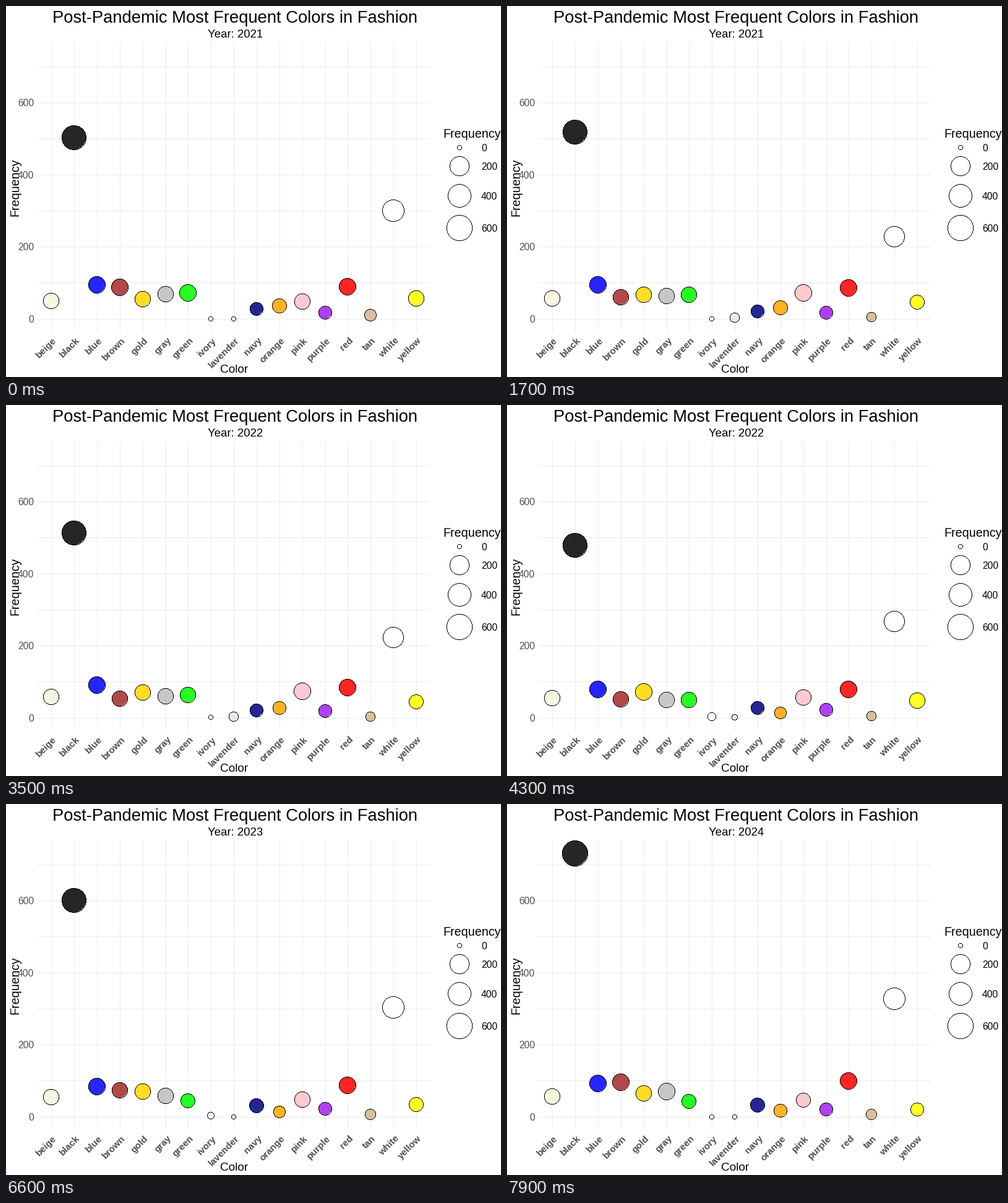
A matplotlib script for the animation above (8000 ms loop, 800x600 px).

```python
import matplotlib.pyplot as plt
import numpy as np
from matplotlib.animation import FuncAnimation
from matplotlib.colors import to_rgb
from math import floor

WIDTH, HEIGHT, DPI = 800, 600, 100
FRAMES, INTERVAL = 80, 100
KEY_FRAMES = (0, 26, 53, 79)
GRID = "#EBEBEB"
AXIS_TEXT = "#4D4D4D"
ALPHA = 0.85
MAX_FREQUENCY = 731

# name: (fill, frequencies for 2021, 2022, 2023, 2024)
SERIES = {
    "beige": ("#F5F5DC", (49, 58, 52.6, 56)),
    "black": ("#000000", (503, 520, 468, 731)),
    "blue": ("#0000FF", (94, 94, 75, 92)),
    "brown": ("#A52A2A", (87, 54, 49.5, 96)),
    "gold": ("#FFD700", (54, 69, 73, 65)),
    "gray": ("#BEBEBE", (68, 62, 45, 70)),
    "green": ("#00FF00", (72, 66, 44, 43)),
    "ivory": ("#FFFFF0", (0, 0, 4, 0)),
    "lavender": ("#E6E6FA", (0, 4, 0, 0)),
    "navy": ("#000080", (27, 19, 29, 32)),
    "orange": ("#FFA500", (35, 30, 9, 17)),
    "pink": ("#FFC0CB", (48, 77, 51, 45)),
    "purple": ("#A020F0", (17, 17, 23, 20)),
    "red": ("#FF0000", (89, 84, 76, 99)),
    "tan": ("#D2B48C", (9, 3, 4.5, 7)),
    "white": ("#FFFFFF", (299, 213, 280, 327)),
    "yellow": ("#FFFF00", (56, 43, 48, 20)),
}

plt.rcParams["font.family"] = "Liberation Sans"
fig = plt.figure(figsize=(WIDTH / DPI, HEIGHT / DPI), dpi=DPI, facecolor="white")
ax = fig.add_axes((0, 0, 1, 1))
ax.axis("off")


def x_pos(index):
    return floor(73.66 + 36.87 * index)


def y_pos(value):
    return floor(506.15 - 0.5825 * value)


def radius_of(value):
    return 3.6 + 17.8 * (value / MAX_FREQUENCY) ** 0.25


def cubic_in_out(p):
    return 4 * p ** 3 if p < 0.5 else 1 - 4 * (1 - p) ** 3


def label(x, y, text, size, ha="center", **style):
    return ax.text(x, y, text, fontsize=size * 72 / DPI, ha=ha, va="baseline",
                   rotation_mode="anchor", **style)


def disc(size, diameter):
    """Hard-edged disc in the top-left corner of a size x size mask."""
    d = np.arange(size) + 0.5 - diameter / 2
    return d[:, None] ** 2 + d ** 2 <= (diameter / 2) ** 2


def draw_bubble(canvas, x, y, radius, fill=None):
    r = floor(radius + 0.5)
    patch = canvas[y - r:y + r, x - r:x + r]
    if fill is not None:
        inside = disc(2 * r, 2 * r - 1)
        patch[inside] = ALPHA * np.array(to_rgb(fill)) + (1 - ALPHA) * patch[inside]
    whole = disc(2 * r, 2 * r)
    p = np.pad(whole, 1)
    core = p[:-2, 1:-1] & p[2:, 1:-1] & p[1:-1, :-2] & p[1:-1, 2:]
    patch[whole & ~core] = 0


background = np.ones((HEIGHT, WIDTH, 3))

# Grid and axes
for value in range(0, 701, 100):
    y = y_pos(value)
    background[y, 51:685] = to_rgb(GRID)
    if value % 200 == 0:
        label(45, y + 6, str(value), 15.6, ha="right", color=AXIS_TEXT)

for i, name in enumerate(SERIES):
    x = x_pos(i)
    background[58:527, x] = to_rgb(GRID)
    label(x + 9.5, 541.5, name, 15.2, ha="right", rotation=45, weight="bold",
          color=AXIS_TEXT)

label(370, 27, "Post-Pandemic Most Frequent Colors in Fashion", 27.45)
subtitle = label(370.5, 51, "", 18.6)
label(368.5, 593, "Color", 19)
label(20.5, 293, "Frequency", 19.8, rotation=90)

# Size legend
label(706, 213, "Frequency", 19.8, ha="left")
for value, y in ((0, 229), (200, 259), (400, 307), (600, 359)):
    draw_bubble(background, 733, y, radius_of(value))
    label(768, y + 6, str(value), 15.6, ha="left")

plot = ax.imshow(background, extent=(0, WIDTH, HEIGHT, 0), aspect="auto",
                 interpolation="nearest")


def update(frame):
    step = sum(frame >= k for k in KEY_FRAMES[1:-1])
    start, end = KEY_FRAMES[step:step + 2]
    t = cubic_in_out((frame - start) / (end - start))

    canvas = background.copy()
    for i, (fill, values) in enumerate(SERIES.values()):
        a, b = values[step:step + 2]
        radius = radius_of(a) * (1 - t) + radius_of(b) * t
        draw_bubble(canvas, x_pos(i), y_pos(a + (b - a) * t), radius, fill)
    plot.set_data(canvas)

    subtitle.set_text(f"Year: {2021 + 3 * frame // (FRAMES - 1)}")
    return []


animation = FuncAnimation(fig, update, frames=FRAMES, interval=INTERVAL,
                          init_func=lambda: update(0), repeat=True,
                          repeat_delay=0, blit=False)
plt.show()
```
